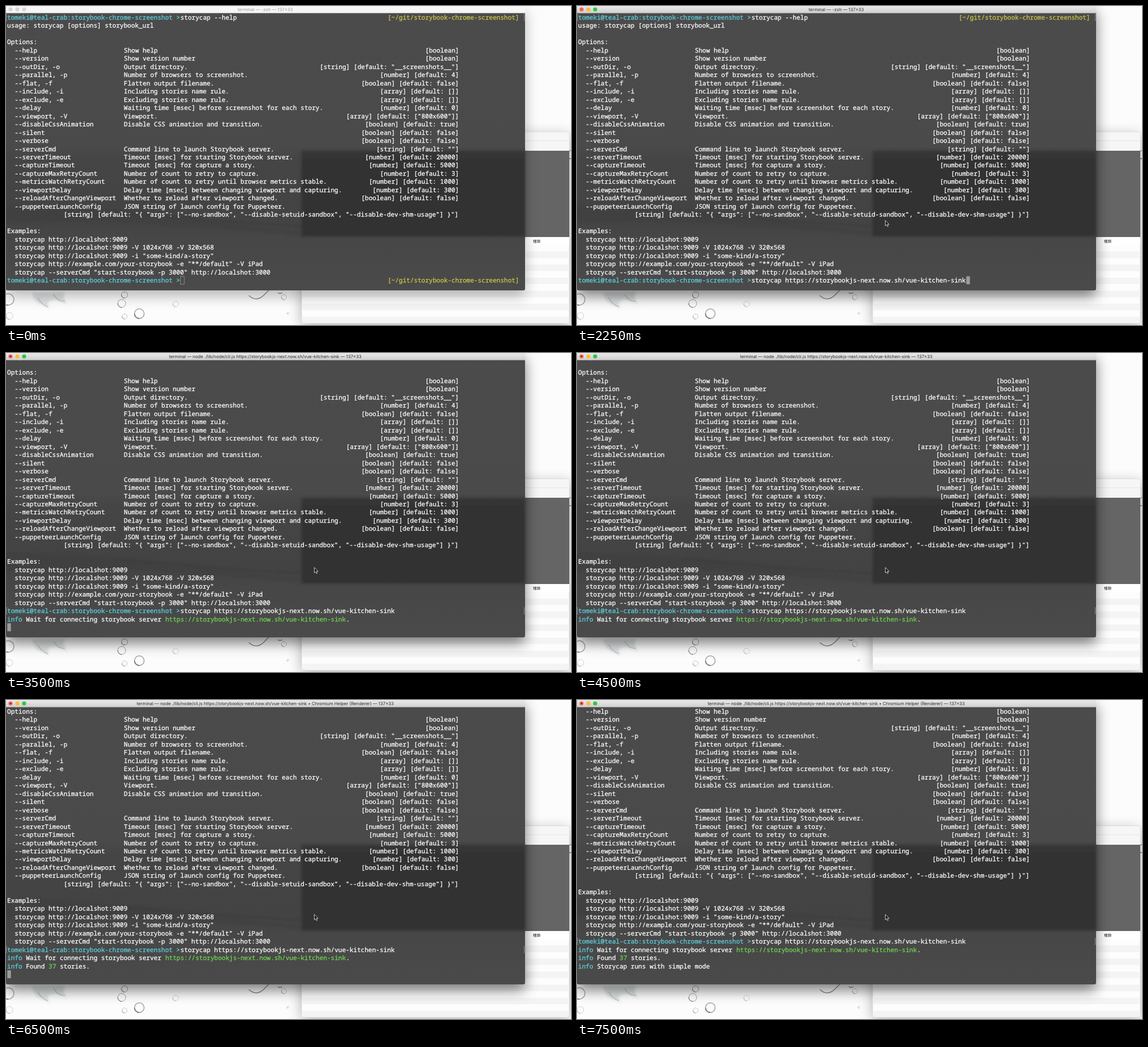
Recreate the animation shown at these times as an HTML page. Size 996 px wide and 562 px high, loop 8000 ms.

```html
<!DOCTYPE html>
<html lang="en">
<head>
<meta charset="utf-8">
<title>Terminal session</title>
<style>
  html, body { margin: 0; width: 100%; height: 100%; overflow: hidden; background: #fcfcfc; }
  svg { display: block; width: 996px; height: 562px; }
  text { white-space: pre; text-rendering: geometricPrecision; }
  .mono { font: 11.067px "Noto Sans Mono", monospace; stroke-width: .28; }
  .title { font: 7.75px Inter, sans-serif; text-anchor: middle; }
  .label { font: 6.5px "Noto Sans CJK JP", "Noto Sans CJK", sans-serif; }
</style>
</head>
<body>
<svg id="stage" viewBox="0 0 996 562" xmlns="http://www.w3.org/2000/svg">
  <defs>
    <linearGradient id="bar" x2="0" y2="1">
      <stop stop-color="#e9e9e9"/><stop offset="1" stop-color="#d0d0d0"/>
    </linearGradient>
    <linearGradient id="glass" x2="0" y2="1">
      <stop stop-color="#4b4b4b"/><stop offset=".48" stop-color="#4a4a4a"/>
      <stop offset=".53" stop-color="#454545"/><stop offset=".74" stop-color="#434343"/>
      <stop offset=".82" stop-color="#474747"/><stop offset="1" stop-color="#4a4a4a"/>
    </linearGradient>
    <linearGradient id="panel" x2="0" y2="1">
      <stop stop-color="#343434"/><stop offset="1" stop-color="#303030"/>
    </linearGradient>
    <filter id="soft" x="-20%" y="-20%" width="140%" height="140%"><feGaussianBlur stdDeviation="12"/></filter>
    <filter id="haze" x="-20%" y="-50%" width="140%" height="200%"><feGaussianBlur stdDeviation="2"/></filter>
    <clipPath id="view"><rect y="12.5" width="915" height="488.5"/></clipPath>
  </defs>

  <rect width="996" height="562" fill="#fcfcfc"/>
  <g id="bubbles" fill="none"></g>

  <g id="finder">
    <rect x="521" y="228" width="472" height="335" fill="#000" opacity=".3" filter="url(#soft)"/>
    <rect x="521" y="222" width="472" height="337" rx="3" fill="#fdfdfd" stroke="#c8c8c8" stroke-width=".6"/>
    <rect x="521.3" y="222.3" width="471.4" height="33" rx="3" fill="#f6f6f6"/>
    <path d="M521 237.5H993" stroke="#dedede" stroke-width=".7"/>
    <rect x="521" y="255" width="472" height="152" fill="#656565"/>
    <rect x="521" y="407" width="472" height="14" fill="#fff"/>
    <g id="stripes" fill="#f4f4f4"></g>
    <text class="label" x="929" y="416.7" fill="#222">種類</text>
  </g>

  <rect id="shadow" x="0" y="10" width="915" height="501" fill="#000" filter="url(#soft)"/>
  <g id="terminal">
    <path d="M0 12H915V498Q915 501 912 501H3Q0 501 0 498Z" fill="url(#glass)"/>
    <g filter="url(#haze)">
      <path d="M0 352Q120 352 190 362T520 396V404Q380 392 250 384T0 382Z" fill="#3c3c3c" opacity=".5"/>
      <path d="M190 362L360 378L520 388" fill="none" stroke="#3b3b3b" stroke-width="2.5"/>
    </g>
    <rect x="521" y="255" width="394" height="151" fill="url(#panel)" filter="url(#haze)"/>
    <g clip-path="url(#view)"><g id="lines" class="mono"></g></g>
    <rect id="caret" width="6.4" height="14"/>
    <rect id="bar-fill" width="915" height="12.5"/>
    <path d="M0 12.3H915" stroke="#b4b4b4" stroke-width=".5"/>
    <g id="lights"></g>
    <circle id="busy" cx="8" cy="6" r="1.3" fill="#8a1a12"/>
    <text id="title" class="title" x="457" y="8.7"></text>
  </g>
  <path id="pointer" d="M0 0V9.4L2.2 7.4L3.7 10.8L5.2 10.1L3.8 6.8H6.6Z" fill="#111" stroke="#f4f4f4" stroke-width=".8" stroke-linejoin="round"/>
</svg>
<script>
const $ = id => document.getElementById(id);
const LOOP = 8000, CELL = 6.64, ROW = 14.47, LEFT = 2, TOP = 13;
const WHITE = '#ffffff', CYAN = '#5fd0de', YELLOW = '#cbc64b', GREEN = '#70d552';

function add(parent, tag, attrs, text = '') {
  const node = document.createElementNS('http://www.w3.org/2000/svg', tag);
  for (const key in attrs) node.setAttribute(key, attrs[key]);
  node.textContent = text;
  return parent.appendChild(node);
}
const set = (id, attrs) => { for (const key in attrs) $(id).setAttribute(key, attrs[key]); };
const colX = col => LEFT + col * CELL;

function put(row, col, text, fill = WHITE) {
  return add($('lines'), 'text', { x: colX(col), y: TOP + 11 + row * ROW, fill, stroke: fill }, text);
}
const putEnd = (row, end, text, fill) => put(row, end - text.length, text, fill);

// Parts given one after another, each as [text, colour]
function run(row, ...parts) {
  let col = 0;
  return parts.map(([text, fill]) => {
    const node = put(row, col, text, fill);
    col += text.length;
    return node;
  });
}

const PROMPT = 'tomeki@teal-crab:storybook-chrome-screenshot >';
const CWD = '[~/git/storybook-chrome-screenshot]';
const URL_TEXT = 'https://storybookjs-next.now.sh/vue-kitchen-sink';
const INPUT = PROMPT.length;

function marks(row) {
  const g = add($('lines'), 'g', { fill: 'none', stroke: '#a0a0a0', 'stroke-width': .8 });
  const y = TOP + row * ROW + 1.5;
  add(g, 'path', { d: `M2 ${y}H.6v11H2M912.4 ${y}h1.2v11h-1.2` });
  return g;
}

const bool = v => `[boolean] [default: ${v}]`;
const num = v => `[number] [default: ${v}]`;
const options = [
  ['--help', 'Show help', '[boolean]'],
  ['--version', 'Show version number', '[boolean]'],
  ['--outDir, -o', 'Output directory.', '[string] [default: "__screenshots__"]'],
  ['--parallel, -p', 'Number of browsers to screenshot.', num(4)],
  ['--flat, -f', 'Flatten output filename.', bool(false)],
  ['--include, -i', 'Including stories name rule.', '[array] [default: []]'],
  ['--exclude, -e', 'Excluding stories name rule.', '[array] [default: []]'],
  ['--delay', 'Waiting time [msec] before screenshot for each story.', num(0)],
  ['--viewport, -V', 'Viewport.', '[array] [default: ["800x600"]]'],
  ['--disableCssAnimation', 'Disable CSS animation and transition.', bool(true)],
  ['--silent', '', bool(false)],
  ['--verbose', '', bool(false)],
  ['--serverCmd', 'Command line to launch Storybook server.', '[string] [default: ""]'],
  ['--serverTimeout', 'Timeout [msec] for starting Storybook server.', num(20000)],
  ['--captureTimeout', 'Timeout [msec] for capture a story.', num(5000)],
  ['--captureMaxRetryCount', 'Number of count to retry to capture.', num(3)],
  ['--metricsWatchRetryCount', 'Number of count to retry until browser metrics stable.', num(1000)],
  ['--viewportDelay', 'Delay time [msec] between changing viewport and capturing.', num(300)],
  ['--reloadAfterChangeViewport', 'Whether to reload after viewport changed.', bool(false)],
  ['--puppeteerLaunchConfig', 'JSON string of launch config for Puppeteer.', '']
];
const examples = [
  'http://localshot:9009',
  'http://localshot:9009 -V 1024x768 -V 320x568',
  'http://localshot:9009 -i "some-kind/a-story"',
  'http://example.com/your-storybook -e "**/default" -V iPad',
  '--serverCmd "start-storybook -p 3000" http://localshot:3000'
];

run(0, [PROMPT, CYAN], ['storycap --help']);
putEnd(0, 136, CWD, YELLOW);
marks(0);
put(1, 0, 'usage: storycap [options] storybook_url');
put(3, 0, 'Options:');
options.forEach(([flag, about, type], i) => {
  put(4 + i, 2, flag);
  put(4 + i, 31, about);
  putEnd(4 + i, 120, type);
});
putEnd(24, 120, '[string] [default: "{ "args": ["--no-sandbox", "--disable-setuid-sandbox", "--disable-dev-shm-usage"] }"]');
put(26, 0, 'Examples:');
examples.forEach((text, i) => put(27 + i, 2, 'storycap ' + text));
put(32, 0, PROMPT, CYAN);
const input = put(32, INPUT, '');
const cwd = putEnd(32, 136, CWD, YELLOW);
const inputMarks = marks(32);
const output = [
  run(33, ['info ', CYAN], ['Wait for connecting storybook server '], [URL_TEXT, GREEN], ['.']),
  run(34, ['info ', CYAN], ['Found '], ['37', GREEN], [' stories.']),
  run(35, ['info ', CYAN], ['Storycap runs with simple mode'])
];

// Backdrop: rings of water and a faint splash
const rings = [[4, 517, 10, 1.4], [204, 524, 7, 1], [209, 509, 5.5, 1], [209, 547, 4.5, .6],
  [235, 542, 8.5, 1.5], [299, 525, 5, .4], [490, 513, 4.5, .6], [497, 541, 1.8, .4], [6, 546, 6, .5], [995, 262, 7, 1.6]];
for (const [cx, cy, r, w] of rings) {
  add($('bubbles'), 'circle', { cx, cy, r, stroke: '#9da3a3', 'stroke-width': w });
  add($('bubbles'), 'path', { d: `M${cx - r} ${cy}a${r} ${r} 0 0 0 ${r} ${r}`, stroke: '#6b7171', 'stroke-width': w });
}
add($('bubbles'), 'path', { d: 'M428 510Q442 523 456 508T468 500M479 505q4 3 8 0', stroke: '#858b8b', 'stroke-width': 1.4 });
add($('bubbles'), 'path', { d: 'M46 505Q50 522 62 526T78 536Q68 520 82 518T110 528Q98 516 104 504Z', fill: '#c9d0d0', opacity: .6, filter: 'url(#haze)' });
add($('bubbles'), 'path', { d: 'M56 514q6 12 18 16M84 508q8 14 20 12', stroke: '#b0b7b7', 'stroke-width': 1.2 });

for (let y = 432.5; y < 557; y += 23) {
  add($('stripes'), 'rect', { x: 521.5, y, width: 471, height: Math.min(11.5, 558 - y) });
}
const lights = ['#fb5f57', '#fcbc2f', '#29c83f'];
lights.forEach((_, i) => add($('lights'), 'circle', { cx: 8 + 12 * i, cy: 6, r: 3.6 }));

// Value of the last step reached
const at = (t, steps) => steps.reduce((v, [time, next]) => t >= time ? next : v, steps[0][1]);

const nodeTitle = helper =>
  `terminal — node ./lib/node/cli.js ${URL_TEXT}${helper ? ` • Chromium Helper (${helper})` : ''} — 137×33`;
const titles = [[0, 'terminal — -zsh — 137×33'], [3250, nodeTitle()], [5250, nodeTitle('Renderer')],
  [6750, nodeTitle()], [7000, nodeTitle('GPU')], [7500, nodeTitle('Renderer')]];
const typed = [[0, ''], [1750, 'storycap --help'], [2250, 'storycap ' + URL_TEXT]];
const scroll = [[0, 0], [3250, 1], [3500, 2], [6500, 3], [6750, 4]];
const blink = [[0, 1], [1500, 0], [1750, 1], [4500, 0], [5000, 1], [5500, 0], [6000, 1], [7500, 0]];
const pointer = [[0, null], [250, [987.5, 173]], [500, [543.5, 377.8]]];
const show = (node, on) => node.setAttribute('visibility', on ? 'visible' : 'hidden');

function draw(t) {
  const active = t >= 1000, running = t >= 3250;
  const offset = at(t, scroll), text = at(t, typed), pos = at(t, pointer);

  set('lines', { transform: `translate(0 ${-offset * ROW})` });
  input.textContent = text;
  show(cwd, t < 2250);
  show(inputMarks, running);
  // Each scroll after the first brings one line of output
  output.forEach((parts, i) => parts.forEach(node => show(node, offset >= i + 2)));

  set('caret', {
    x: running ? LEFT + .3 : colX(INPUT + text.length) + .3,
    y: 476.2,
    fill: active ? '#9c9c9c' : 'none',
    stroke: active ? 'none' : '#9c9c9c',
    'stroke-width': .8
  });
  show($('caret'), at(t, blink));

  $('title').textContent = at(t, titles);
  set('title', { fill: active ? '#2c2c2c' : '#9b9b9b' });
  set('bar-fill', { fill: active ? 'url(#bar)' : '#f6f6f6' });
  [...$('lights').children].forEach((dot, i) => dot.setAttribute('fill', active ? lights[i] : '#d6d6d6'));
  show($('busy'), running);
  set('shadow', { opacity: active ? .52 : .28 });

  show($('pointer'), pos);
  if (pos) set('pointer', { transform: `translate(${pos})` });
}

function tick(now) {
  draw(now % LOOP);
  requestAnimationFrame(tick);
}
draw(0);
requestAnimationFrame(tick);
</script>
</body>
</html>
```
